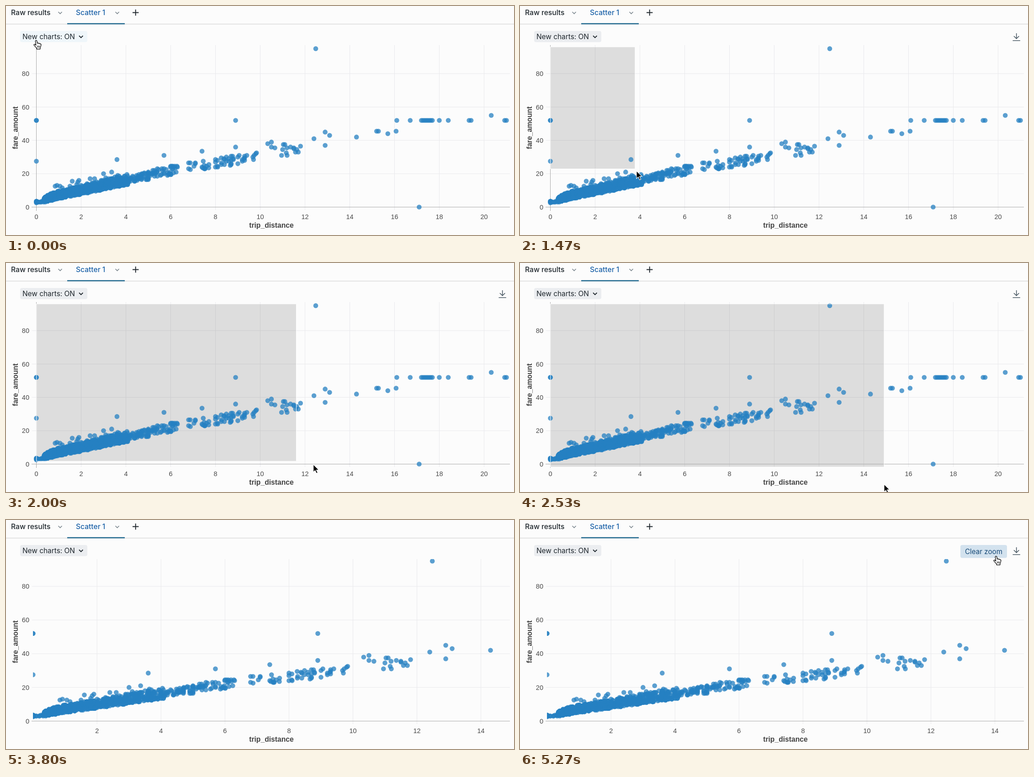
Recreate the animation shown at these times as an HTML page. Size 1112 by 504 pixels, loop 5.34 s.

```html
<!DOCTYPE html>
<html lang="en">
<head>
<meta charset="utf-8">
<title>Scatter zoom</title>
<style>
  html, body { margin: 0; width: 100%; height: 100%; overflow: hidden; background: #fcfcfc; }
  svg { display: block; width: 1112px; height: 504px; }
  .ui { font-family: Inter, "Open Sans", sans-serif; font-size: 15.4px; fill: #1f272d; }
  .tab { font-size: 15.6px; font-weight: 500; }
  .tick { font: 14.5px "Liberation Sans", Arial, sans-serif; fill: #4a4a4a; }
  .title { font: bold 15.7px "Liberation Sans", Arial, sans-serif; fill: #444; text-anchor: middle; }
  .grid { stroke: #e9e9ec; }
  .axis { stroke: #a8a8a8; }
  .dots { fill: #2680c2; fill-opacity: .75; }
  .line { fill: none; stroke: #1f272d; stroke-width: 1.6; }
</style>
</head>
<body>
<svg viewBox="0 0 1112 504">
  <defs><clipPath id="plot"><rect x="59" y="86" width="1044" height="363"/></clipPath></defs>

  <path d="M0 39.8H1112" stroke="#dcdcdc" stroke-width="1.4"/>
  <path d="M134 39H260" stroke="#21698f" stroke-width="2.4"/>
  <text class="ui tab" x="11" y="20.3">Raw results</text>
  <text class="ui tab" x="153" y="20.3" style="fill:#1c62a8">Scatter 1</text>
  <path class="line" d="M114.5 13l4 4 4-4M239.5 13l4 4 4-4" style="stroke:#7b868e"/>
  <path class="line" d="M277 14.5h13.4M283.7 7.8v13.4" style="stroke-width:1.9"/>

  <g id="full"></g>
  <g id="zoomed"></g>

  <text class="title" x="581" y="488">trip_distance</text>
  <text class="title" transform="translate(26.3 268) rotate(-90)">fare_amount</text>

  <rect id="menu" x="31" y="55" width="147" height="24.5" rx="4"/>
  <text class="ui" x="36" y="73">New charts: ON</text>
  <path class="line" d="M160 65.5l4.2 4.2 4.2-4.2" style="stroke-width:1.8"/>

  <g id="clear">
    <rect id="hover" x="964" y="55" width="102" height="28.5" rx="4" fill="#d3e2ee"/>
    <text class="ui" x="974" y="75" style="font-size:15.2px;fill:#174a78">Clear zoom</text>
  </g>
  <path id="save" class="line" d="M1086.7 60v11.5M1081 66.2l5.7 5.6 5.7-5.6M1078.5 76.3h16.4" style="stroke:#4c5b66"/>

  <path id="arrow" d="M0 0V16.8L3.9 13.2 6.8 19.6 9.6 18.4 6.7 12.1H12Z" fill="#000" stroke="#fff" stroke-width="1.1"/>
  <g id="hand" stroke="#000" stroke-width="1.3" stroke-linejoin="round">
    <path fill="#fff" d="M-1.7 1.4C-1.7-.7 1.2-.9 1.7 1.2L2.7 6C3.8 5 5.2 5.4 5.4 6.6C6.4 5.6 8 6 8.2 7.4C9.2 6.8 10.8 7.2 10.8 9C10.8 12 9.8 14 8.8 16V18.8H1.2V16.8C-1 14.6-2.6 12.4-4.6 10.4C-5.8 8.8-3.8 7.4-2.4 8.6L-.4 10.4Z"/>
    <path fill="none" stroke-width="1" d="M2.6 11.5l.3 4M5 11.3v4.2M7.3 11.4l-.2 4"/>
  </g>
</svg>
<script>
const LOOP = 5340, STEP = LOOP / 80, ZOOM_AT = 3070, LAG = 36;
const $ = id => document.getElementById(id);

function add(parent, tag, attrs, text) {
  const el = document.createElementNS("http://www.w3.org/2000/svg", tag);
  for (const k in attrs) el.setAttribute(k, attrs[k]);
  if (text !== undefined) el.textContent = text;
  return parent.appendChild(el);
}

let seed = 4242;
function rnd() {
  seed = (seed * 1664525 + 1013904223) % 4294967296;
  return seed / 4294967296;
}

// Trips that stand apart from the trend
const points = [
  [0, 52], [0, 52], [0, 27.5], [3.6, 28.5], [5.7, 31], [7.4, 33.5], [8.9, 36], [8.9, 52],
  [12.4, 41], [12.48, 95], [12.9, 37], [12.9, 45], [13.1, 43], [14.3, 42],
  [15.2, 45.5], [15.28, 45.5], [15.7, 44], [16.07, 45.5], [17.1, 0], [20.32, 55]
];
// Flat fare
for (const x of [16.1, 16.7, 18, 18.4, 19.33, 19.42, 20.92, 21]) points.push([x, 52]);
for (let i = 0; i < 8; i++) points.push([17.2 + .07 * i, 52]);

// Random trips between two fare limits; a higher bias keeps them near the lower one
function cloud(count, from, to, lo, hi, bias = 1, crowd = 1) {
  for (let i = 0; i < count; i++) {
    let x = from + (to - from) * Math.pow(rnd(), crowd);
    if (rnd() < .5) x = Math.round(x * 10) / 10;
    const a = lo(x), b = hi(x);
    points.push([x, Math.round(2 * (a + (b - a) * Math.pow(rnd(), bias))) / 2]);
  }
}
const low = x => 2.3 + 2.75 * x;
const high = x => Math.min(6.2 + 3.3 * x, 2.8 + 8 * x);
cloud(8, 0, .04, () => 2.5, () => 4);
cloud(16, .1, .5, () => 2.8, x => 3 + 3 * x);
cloud(820, .35, 4.1, low, high, 1.35, 1.75);
cloud(24, .5, 3.7, high, x => high(x) + 4, 1.5);
cloud(55, 4.1, 5.2, x => 4 + 2.5 * x, x => 7 + 2.8 * x);
cloud(42, 5.2, 6.3, x => 6 + 2.2 * x, x => 8.5 + 2.7 * x);
cloud(56, 6.8, 9.9, x => 6 + 2.2 * x, x => 13 + 2 * x);
cloud(18, 10, 11.9, () => 31, () => 39);

// One chart at a given scale; returns the two parts of its selection box
function chart(root, x0, sx, sy, firstX, lastX) {
  const px = v => x0 + sx * v, py = v => 442.5 - sy * v;
  const label = (x, y, v, anchor) => add(root, "text", { class: "tick", x, y, "text-anchor": anchor }, v);
  for (let v = 0; v <= 80; v += 20) {
    if (v) add(root, "path", { class: "grid", d: `M57 ${py(v)}H1103` });
    label(51, py(v) + 5.2, v, "end");
  }
  for (let v = firstX; v <= lastX; v += 2) {
    if (v) add(root, "path", { class: "grid", d: `M${px(v)} 86V449` });
    label(px(v), 469.3, v, "middle");
  }
  const fill = add(root, "rect", { fill: "#333", "fill-opacity": .155 });
  add(root, "path", { class: "axis", d: "M56 442.6H1103" + (firstX ? "" : `M${x0} 86V451`) });
  const dots = add(root, "g", { class: "dots", "clip-path": "url(#plot)" });
  for (const [x, y] of points)
    if (px(x) < 1110) add(dots, "circle", { cx: px(x).toFixed(1), cy: py(y).toFixed(1), r: 5.3 });
  const rim = add(root, "rect", { fill: "none", stroke: "#fff" });
  return [fill, rim];
}
const brush = chart($("full"), 66.5, 49, 3.67, 0, 20);
chart($("zoomed"), 59.2, 70.03, 3.706, 2, 14);

// Rests of the pointer: time, x, y
const rests = [
  [0, 66, 76], [330, 65, 89], [1000, 65, 89], [1468, 255, 363], [2336, 878, 483],
  [2500, 797, 487], [2840, 797, 487], [3070, 797, 502], [3140, 797, 515],
  [4100, 766, 515], [4472, 775, 261], [5000, 1042, 80], [LOOP, 1042, 80]
];
function pointer(t) {
  const i = Math.max(1, rests.findIndex(r => r[0] >= t));
  const [t0, x0, y0] = rests[i - 1], [t1, x1, y1] = rests[i];
  const k = Math.max(0, (t - t0) / (t1 - t0)), e = k * k * (3 - 2 * k);
  return [x0 + (x1 - x0) * e, y0 + (y1 - y0) * e];
}

const show = (el, on) => { el.style.display = on ? "" : "none"; };

function draw(now) {
  const t = Math.floor((now % LOOP + 10) / STEP) % 80 * STEP;
  const zoom = t >= ZOOM_AT, inside = (t > 190 && t < 2860) || t > 4230;
  const onMenu = t < 190, onClear = t > 4900, hand = onMenu || onClear;
  show($("full"), !zoom);
  show($("zoomed"), zoom);
  show($("save"), inside);
  show($("clear"), zoom && inside);
  show($("hover"), onClear);
  $("menu").setAttribute("fill", onMenu ? "#eff6fa" : "#ebedf0");

  // The box follows the pointer a little late and stays inside the plot
  const [cx, cy] = pointer(t - LAG);
  for (const r of brush) {
    show(r, t > 1000 && !zoom);
    r.setAttribute("x", 66.7);
    r.setAttribute("y", 90);
    r.setAttribute("width", Math.max(0, cx - 66.7));
    r.setAttribute("height", Math.max(0, Math.min(cy, 449) - 90));
  }

  show($("hand"), hand);
  show($("arrow"), !hand);
  $(hand ? "hand" : "arrow").setAttribute("transform", `translate(${pointer(t)})`);
}

const start = performance.now();
function tick() {
  draw(performance.now() - start);
  requestAnimationFrame(tick);
}
draw(0);
requestAnimationFrame(tick);
</script>
</body>
</html>
```
